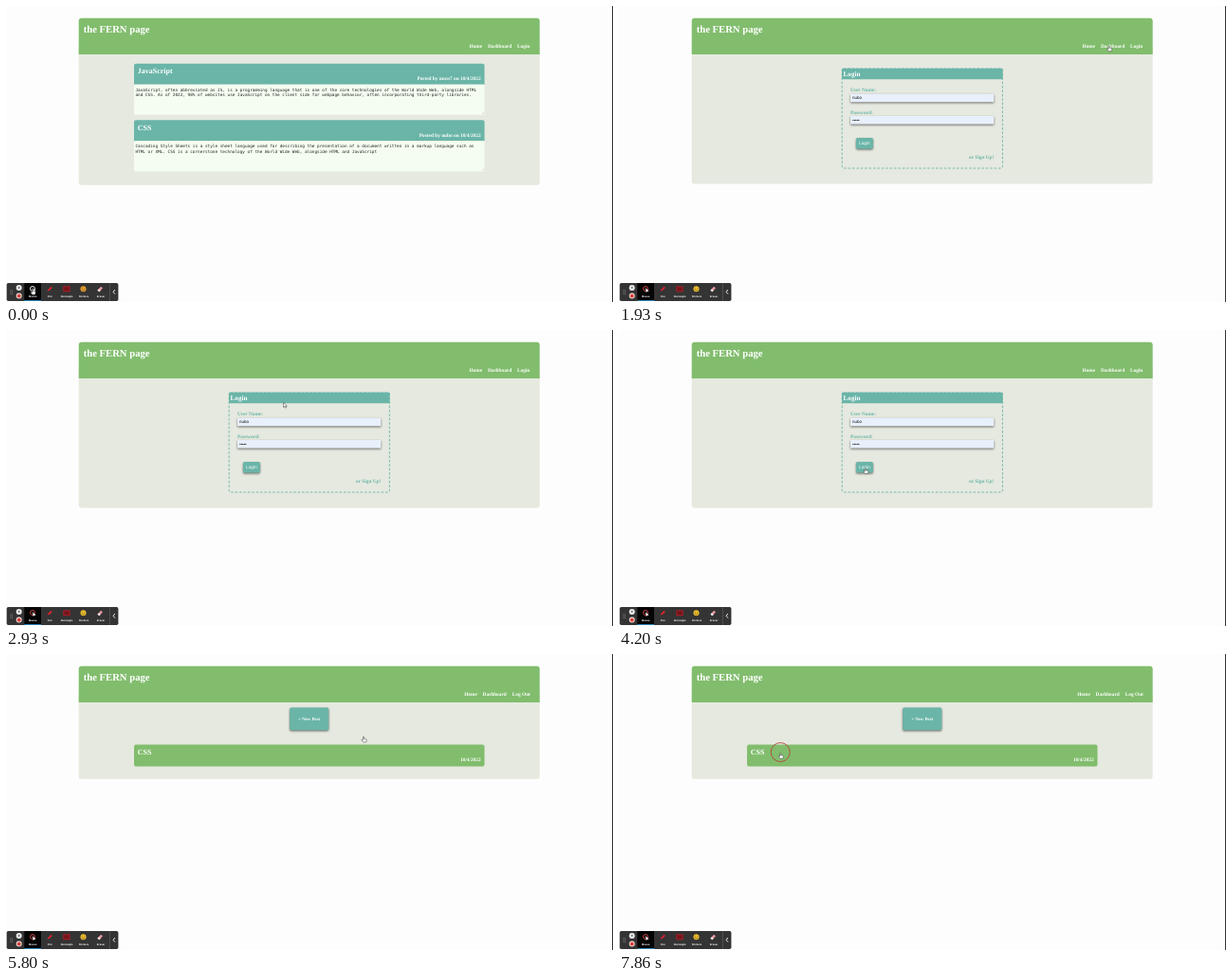
Recreate the animation shown at these times as an HTML page. Size 640 px wide and 312 px high, loop 8000 ms.

```html
<!DOCTYPE html>
<html lang="en">
<head>
<meta charset="utf-8">
<title>Blog walkthrough</title>
<style>
  html, body { margin: 0; width: 100%; height: 100%; overflow: hidden; background: #fdfdfd; }
  svg { display: block; width: 100vw; height: 100vh; }
  text { font: bold 5.33px "Liberation Serif", serif; fill: #fff; text-rendering: geometricPrecision; white-space: pre; }
  .title { font-size: 10.67px; }
  .heading { font-size: 8px; }
  .mono { font: 4.377px "DejaVu Sans Mono", monospace; fill: #222; }
  .sans { font: 4.44px "Liberation Sans", sans-serif; }
  .tool { font: bold 2.7px "Liberation Sans", sans-serif; text-anchor: middle; }
  .end { text-anchor: end; }
  .mid { text-anchor: middle; }
  .teal { fill: #6ab5a8; }
  .green { fill: #81bd6d; }
  .sage { fill: #e6e9df; }
  .raised { filter: drop-shadow(.7px 1px .8px rgba(0,0,0,.55)); }
</style>
</head>
<body>
<svg viewBox="0 0 640 312" preserveAspectRatio="none">
  <rect width="640" height="312" fill="#fdfdfd"/>
  <rect x="639" width="1" height="312" fill="#333"/>
  <rect id="main" class="sage" x="76.7" y="40" width="486" height="148.7" rx="3"/>
  <path class="green" d="M76.7 51V16q0-3.300 3.300-3.300H559.400q3.300 0 3.300 3.300V51z"/>
  <text class="title" x="81.700" y="27.500">the FERN page</text>
  <g id="nav"></g>
  <g id="home"></g>

  <g id="login">
    <rect x="235.200" y="66" width="169.200" height="105" rx="1.500" fill="none" stroke="#6ab5a8" stroke-width=".9" stroke-dasharray="2.600 1.800"/>
    <rect class="teal" x="235" y="65.700" width="169.600" height="11.600" rx="1"/>
    <text x="236.500" y="74" style="font-size:7.200px">Login</text>
    <g style="fill:#6ab5a8">
      <text x="244" y="90.300" style="fill:inherit">User Name:</text>
      <text x="244" y="113.700" style="fill:inherit">Password:</text>
      <text class="end" x="395.300" y="160.600" style="fill:inherit">or Sign Up!</text>
    </g>
    <rect class="raised" x="244" y="92.600" width="151.300" height="8.700" rx=".7" fill="#e8f0fc"/>
    <rect class="raised" x="244" y="115.900" width="151.300" height="8.700" rx=".7" fill="#e8f0fc"/>
    <text class="sans" x="246" y="98.300" style="fill:#111">nubo</text>
    <path d="M246.900 120.300h6.400" stroke="#111" stroke-width="1.200" stroke-linecap="round" stroke-dasharray="0 1.500"/>
    <rect class="teal raised" x="250" y="139" width="17.800" height="11.400" rx="1.500"/>
    <text class="sans mid" x="258.900" y="146.200" style="font-size:4.800px">Login</text>
  </g>

  <g id="dashboard">
    <rect class="teal raised" x="299.200" y="56.600" width="41" height="23.600" rx="1.500"/>
    <text class="mid" x="319.700" y="69.800" style="font-size:4.800px">+ New Post</text>
    <rect class="green" x="135" y="95.500" width="369.500" height="23" rx="2"/>
    <text class="heading" x="138.800" y="106.200">CSS</text>
    <text class="end" x="500.600" y="112.900">10/4/2022</text>
  </g>

  <g id="toolbar">
    <rect x=".7" y="292" width="117.700" height="19" rx="1.800" fill="#343434"/>
    <path d="M4.800 299.500v5M6.500 299.500v5" stroke="#aaa" stroke-width=".8" stroke-dasharray=".8 1.100"/>
    <circle cx="13.700" cy="296.900" r="3" fill="#eee"/>
    <path d="M12.500 296.900h2.400m-1.200-1.200v2.400" stroke="#555" stroke-width=".7"/>
    <circle cx="13.700" cy="305.600" r="3" fill="#f0d5d2"/>
    <circle cx="13.700" cy="305.600" r="1.900" fill="#d63a32"/>
    <rect x="19.300" y="292" width="17.700" height="19" fill="#050505"/>
    <rect x="19.300" y="310" width="17.700" height="1" fill="#2a83b8"/>
    <circle id="mouseDot" cx="28" cy="298" r="2.500" fill="none" stroke-width=".9"/>
    <path d="M28 297.200l3.600 3.300-1.800.2-1 1.600z" fill="#fff"/>
    <path d="M43.500 300.500l1-1.800 3-3 1.300 1.300-3 3z" fill="#e0232e"/>
    <rect x="60.800" y="295.800" width="6.400" height="5" fill="#74151b" stroke="#b81e28" stroke-width=".8"/>
    <circle id="sticker" cx="81.500" cy="298.300" r="3"/>
    <path d="M80.400 297.300h.1m2 0h.1m-2.700 1.900q1.600 1.600 3.200 0" fill="none" stroke="#533" stroke-width=".6" stroke-linecap="round"/>
    <path d="M96.500 299.700l3.500-4 2 1.600-3.600 4z" fill="#ef9aa4"/>
    <path d="M96.500 299.700l1.200-1.400 2 1.600-1.300 1.400z" fill="#eee"/>
    <path d="M109.400 292v19" stroke="#666" stroke-width=".6"/>
    <path d="M114.900 299l-1.900 2.300 1.900 2.300" fill="none" stroke="#fff" stroke-width=".9"/>
  </g>

  <circle id="ring" r="10" fill="none" stroke="#b8443a" stroke-width=".9"/>
  <g id="cursor" stroke="#222" stroke-width=".45" stroke-linejoin="round" fill="#fff">
    <path id="arrow" d="M0 0v5l1.200-1.100.8 1.800.9-.4-.8-1.700h1.600z"/>
    <path id="hand" d="M-.5.500q.5-.9 1 0v2l2.200.5q.6.200.5.900l-.4 2.300H-.4L-2 4q0-.9.800-.6l.7.600z"/>
  </g>
</svg>
<script>
const $ = id => document.getElementById(id);
const show = (id, on) => $(id).setAttribute("display", on ? "inline" : "none");
const text = (x, y, cls, content) => `<text x="${x}" y="${y}" class="${cls}">${content}</text>`;

function post(y, title, byline, lines) {
  return `<path class="teal" d="M135 ${y + 22.300}v-20q0-2 2-2h365.500q2 0 2 2v20z"/>
    <rect x="135" y="${y + 22.300}" width="369.500" height="32" rx="1" fill="#f5fdf0"/>
    <path d="M502 ${y + 53.300}l1.700-1.700m-.8 1.700l.8-.8" stroke="#888" stroke-width=".35"/>` +
    text(138.800, y + 10.900, "heading", title) +
    text(500.600, y + 17.800, "end", byline) +
    lines.map((line, i) => text(136.500, y + 29 + i * 5.600, "mono", line)).join("");
}

$("home").innerHTML =
  post(60.500, "JavaScript", "Posted by moss7 on 10/4/2022", [
    "JavaScript, often abbreviated as JS, is a programming language that is one of the core technologies of the World Wide Web, alongside HTML",
    "and CSS. As of 2022, 98% of websites use JavaScript on the client side for webpage behavior, often incorporating third-party libraries."]) +
  post(119.900, "CSS", "Posted by nubo on 10/4/2022", [
    "Cascading Style Sheets is a style sheet language used for describing the presentation of a document written in a markup language such as",
    "HTML or XML. CSS is a cornerstone technology of the World Wide Web, alongside HTML and JavaScript"]);

["Mouse", "Pen", "Rectangle", "Stickers", "Eraser"].forEach((name, i) =>
  $("toolbar").insertAdjacentHTML("beforeend", text(28.200 + i * 17.950, 306.600, "tool", name)));

const LOOP = 8000;
const pages = [
  { name: "home", start: 0, bottom: 188.700, nav: [488.500, 508, 539], last: "Login" },
  { name: "login", start: 1860, bottom: 187.600, nav: [488.500, 508, 539], last: "Login" },
  { name: "dashboard", start: 4260, bottom: 131.800, nav: [483.200, 502.600, 533.800], last: "Log Out" }
];

// Pointer tip: time, x, y
const track = [
  [0, 28, 298], [60, 28, 298], [1000, 518.300, 49.700], [1400, 518.300, 49.700],
  [1700, 516.600, 41.500], [2200, 516.600, 41.500], [2860, 292.600, 76.500], [3060, 292.600, 76.500],
  [3530, 268, 128], [3860, 259.700, 145.300], [5130, 259.700, 145.300], [5330, 352, 104],
  [5799, 352, 104], [5800, 377, 86.700], [7000, 377, 86.700], [7460, 176, 103],
  [7600, 172, 104], [7660, 170.200, 104], [8000, 170.200, 104]
];
const handSpans = [[0, 60], [1600, 2250], [3660, 4260], [5800, 8000]];
const clickSpans = [[1730, 1860], [3860, 4200], [7860, 8000]];
const within = (spans, t) => spans.some(([from, to]) => t >= from && t < to);

function pointer(t) {
  const i = track.findIndex(key => key[0] > t);
  const [t0, x0, y0] = track[i - 1], [t1, x1, y1] = track[i];
  const p = (t - t0) / (t1 - t0), eased = p * p * (3 - 2 * p);
  return [x0 + (x1 - x0) * eased, y0 + (y1 - y0) * eased];
}

let current;
function setPage(page) {
  if (page === current) return;
  current = page;
  pages.forEach(p => show(p.name, p === page));
  $("main").setAttribute("height", page.bottom - 40);
  $("nav").innerHTML = ["Home", "Dashboard", page.last]
    .map((label, i) => text(page.nav[i], 44.400, "", label)).join("");
}

function draw(now) {
  const t = now % LOOP;
  const [x, y] = pointer(t);
  const hand = within(handSpans, t);
  setPage(pages.filter(p => t >= p.start).pop());
  $("cursor").setAttribute("transform", `translate(${x} ${y})`);
  show("hand", hand);
  show("arrow", !hand);
  show("ring", within(clickSpans, t));
  $("ring").setAttribute("transform", `translate(${x} ${y - .5})`);
  $("mouseDot").setAttribute("stroke", t < 60 ? "#fff" : "#d8454a");
  $("sticker").setAttribute("fill", t < 60 ? "#f0a52c" : "#f5c62c");
  requestAnimationFrame(draw);
}
requestAnimationFrame(draw);
</script>
</body>
</html>
```
